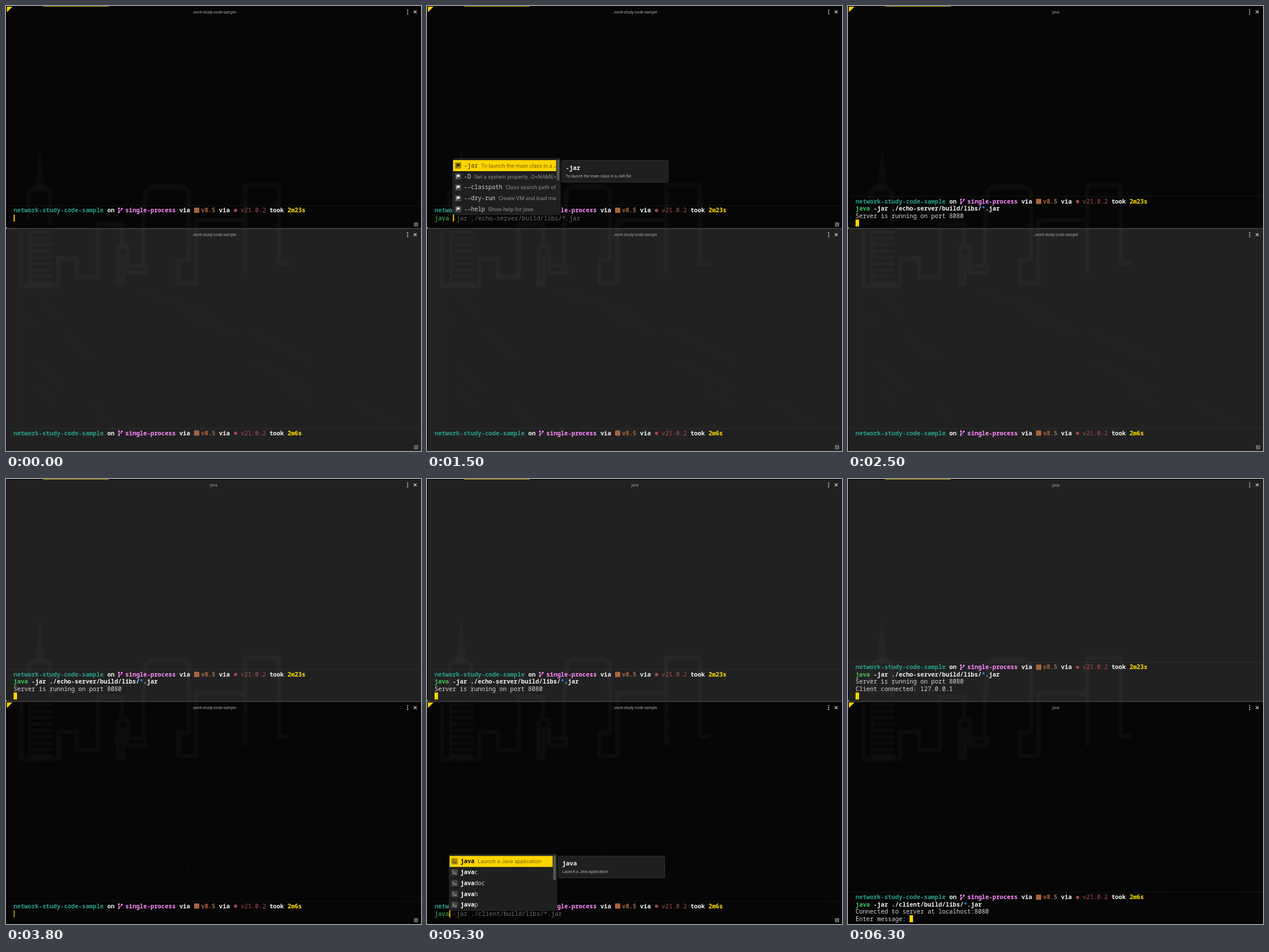
Write an HTML page with a canvas that moves like this. It is 715x768 px and loops after 8000 ms.

```html
<!DOCTYPE html>
<html lang="en">
<head>
<meta charset="utf-8">
<title>Two terminals</title>
<style>
html, body { margin: 0; width: 100%; height: 100%; overflow: hidden; background: #000; }
canvas { display: block; width: 715px; height: 768px; }
</style>
</head>
<body>
<canvas id="stage"></canvas>
<script>
const W = 715, H = 768, LOOP = 8000;
const LEFT = 13, CELL = 6.21, EDIT_CELL = 6.28, ROW = 12.45, PANE = 384.5;
const YELLOW = '#ffd500', GREEN = '#44c25a', WHITE = '#f2f2f2';
const MONO = '"Noto Sans Mono", "DejaVu Sans Mono", monospace';
const SANS = 'Roboto, Arial, sans-serif';

const canvas = document.getElementById('stage');
const dpr = window.devicePixelRatio || 1;
canvas.width = W * dpr;
canvas.height = H * dpr;
const ctx = canvas.getContext('2d');

// Mono advance is 0.6 em, so a cell width fixes the font size.
const mono = (cell, weight = 400) => `${weight} ${cell / 0.6}px ${MONO}`;
const sans = size => `400 ${size}px ${SANS}`;

function text(str, x, y, color, font, align = 'left') {
  ctx.font = font;
  ctx.fillStyle = color;
  ctx.textAlign = align;
  ctx.fillText(str, x, y);
}

function box(x, y, w, h, color) {
  ctx.fillStyle = color;
  ctx.fillRect(x, y, w, h);
}

function roundBox(x, y, w, h, r, fill, line) {
  ctx.beginPath();
  ctx.roundRect(x, y, w, h, r);
  ctx.fillStyle = fill;
  ctx.fill();
  if (line) {
    ctx.strokeStyle = line;
    ctx.lineWidth = 1;
    ctx.stroke();
  }
}

function dot(x, y, r, color) {
  ctx.fillStyle = color;
  ctx.beginPath();
  ctx.arc(x, y, r, 0, 7);
  ctx.fill();
}

// Value of the last key at or before t.
const at = (keys, t) => keys.filter(k => k[0] <= t).pop()[1];

const COMMANDS = {
  icon: 'prompt', bar: 43, title: 'java', note: 'Launch a Java application',
  rows: [['java', 'Launch a Java application'], ['javac'], ['javadoc'], ['javah'], ['javap']]
};
const FLAGS = {
  icon: 'flag', bar: 36, title: '-jar', note: 'To launch the main class in a JAR file',
  rows: [
    ['-jar', 'To launch the main class in a JAR file'],
    ['-D', 'Set a system property, -D<NAME>=<VALUE>'],
    ['--classpath', 'Class search path of directories'],
    ['--dry-run', 'Create VM and load main class'],
    ['--help', 'Show help for java']
  ]
};

const PANES = [
  {
    y: 0, took: '2m23s', command: 'java -jar ./echo-server/build/libs/*.jar', run: 2300,
    typed: [[0, 0], [800, 1], [900, 2], [1000, 3], [1150, 4], [1300, 5], [1650, 40]],
    popup: [[0, null], [850, COMMANDS], [1250, null], [1350, FLAGS], [1600, null]],
    cursor: [[0, 1], [150, 0.45], [200, 0], [650, 1], [2100, 0]],
    output: [[0, ['']], [2450, ['Server is running on port 8080', '']],
      [5850, ['Server is running on port 8080', 'Client connected: 127.0.0.1', '']]]
  },
  {
    y: PANE, took: '2m6s', command: 'java -jar ./client/build/libs/*.jar', run: 5550,
    typed: [[0, 0], [4700, 1], [4850, 2], [4950, 3], [5100, 4], [5400, 35]],
    popup: [[0, null], [4750, COMMANDS], [5350, null]],
    cursor: [[0, 0], [3800, 0.7], [3850, 1], [4300, 0.45], [4350, 0], [4700, 1]],
    output: [[0, ['']], [5800, ['Connected to server at localhost:8080', 'Enter message: ']]]
  }
];
const FOCUS = [[0, 0], [3800, 1]];

const SPIRE = new Path2D('M57 248H60L67 314H50Z');
const SKYLINE = new Path2D(
  'M39 368V322L46 315H70L76 322V376M26 388V483H90V436H122V468H158V376H200V416' +
  'M193 416H210V460H240V448H216M193 416V480H201V428M236 446V380L241 320L249 312H306L315 320V440' +
  'M315 438H297V478H328V370H412V460M412 370V309H470V444H488');
const FLOORS = new Path2D('M41 388V478H80');
for (let i = 0; i < 8; i++) {
  FLOORS.moveTo(41, 390 + i * 11);
  FLOORS.lineTo(80, 390 + i * 11);
}
const ROADS = [
  new Path2D('M22.5 488V710M50 490L90 535M36 535L50 553M100 560L152 611M50 612L100 662' +
    'M58 664L78 684M153 686L190 738M225 492Q300 510 358 534M312 536L390 562M420 560L525 611' +
    'M425 612L525 662M485 664L525 684M600 685L675 726'),
  new Path2D('M22.5 488V710M28 490C60 545 110 555 155 610S205 655 222 690' +
    'M52 490C85 545 140 570 175 615S215 650 232 662M200 488C250 530 285 590 320 690' +
    'M300 530C400 560 500 590 600 700M370 540C480 570 570 600 700 728M440 640L540 710')
];

function scenery(focus) {
  ctx.lineJoin = 'round';
  ctx.lineCap = 'butt';
  const line = (path, width, alpha) => {
    ctx.strokeStyle = `rgba(255,255,255,${alpha})`;
    ctx.lineWidth = width;
    ctx.stroke(path);
  };
  ctx.fillStyle = 'rgba(255,255,255,0.024)';
  ctx.fill(SPIRE);
  line(SKYLINE, 9, 0.018);
  line(SKYLINE, 5, 0.009);
  line(FLOORS, 6, 0.024);
  line(ROADS[focus], 1, 0.03);
}

function chrome(title, active, idle) {
  text(title, 358, 12.6, '#a6a6a6', sans(6.75), 'center');
  [6.8, 10.2, 13.6].forEach(y => dot(692, y, 1, '#ddd'));
  ctx.strokeStyle = '#ddd';
  ctx.lineWidth = 1.1;
  ctx.beginPath();
  ctx.moveTo(702.5, 7.7); ctx.lineTo(707.5, 12.7);
  ctx.moveTo(707.5, 7.7); ctx.lineTo(702.5, 12.7);
  ctx.stroke();
  if (active) {
    ctx.fillStyle = YELLOW;
    ctx.beginPath();
    ctx.moveTo(1.5, 1.3); ctx.lineTo(11, 1.3); ctx.lineTo(1.5, 10.8);
    ctx.fill();
  }
  if (idle) {
    roundBox(703, 373.5, 7, 7, 1, '#777');
    box(704.5, 375, 1.4, 1.4, '#222');
    box(707, 375, 1.4, 1.4, '#222');
    box(704.5, 377.6, 4, 1.2, '#222');
  }
}

function branch(x, y) {
  ctx.strokeStyle = '#ff8cff';
  ctx.lineWidth = 1.1;
  ctx.beginPath();
  ctx.moveTo(x, y - 3); ctx.lineTo(x, y + 3);
  ctx.moveTo(x + 5, y - 2.5);
  ctx.quadraticCurveTo(x + 5, y + 0.6, x, y + 1.2);
  ctx.stroke();
  dot(x, y - 3.2, 1.5, '#ff8cff');
  dot(x, y + 3.4, 1.5, '#ff8cff');
  dot(x + 5, y - 2.8, 1.5, '#ff8cff');
}

function prompt(y, took) {
  box(2, Math.round(y - 9), W - 3, 1, 'rgba(255,255,255,0.055)');
  const word = (col, str, color, weight = 700) =>
    text(str, LEFT + col * CELL, y + 3.5, color, mono(CELL, weight));
  word(0, 'network-study-code-sample', '#2b9c8a');
  word(26, 'on', WHITE, 600);
  branch(194.5, y);
  word(31, 'single-process', '#ff8cff');
  word(46, 'via', WHITE, 600);
  roundBox(324, y - 4.5, 9, 9, 1, '#a5673f');
  word(52, 'v8.5', '#a5673f');
  word(57, 'via', WHITE, 600);
  dot(395.5, y + 0.3, 2.8, '#a8434c');
  word(63, 'v21.0.2', '#b04c56', 500);
  word(71, 'took', WHITE, 600);
  word(76, took, '#ffe000');
}

function command(str, y, cell, weight) {
  const font = mono(cell, weight);
  const known = str.startsWith('java');
  const star = str.indexOf('*');
  const put = (from, to, color) =>
    text(str.slice(from, to), LEFT + from * cell, y + 3.5, color, font);
  if (known) put(0, 4, GREEN);
  const rest = known ? 4 : 0;
  if (star < 0) return put(rest, str.length, WHITE);
  put(rest, star, WHITE);
  put(star, star + 1, '#2f8fff');
  put(star + 1, str.length, WHITE);
}

function itemIcon(kind, x, y, chosen) {
  roundBox(x, y - 5.5, 11, 11, 1.5, chosen ? '#a88d00' : '#444');
  const ink = chosen ? '#2a2300' : '#ddd';
  if (kind === 'flag') {
    box(x + 3, y - 3, 1, 6.5, ink);
    box(x + 4, y - 3, 4.5, 4, ink);
    return;
  }
  ctx.strokeStyle = ink;
  ctx.lineWidth = 0.9;
  ctx.beginPath();
  ctx.moveTo(x + 2.3, y - 2); ctx.lineTo(x + 4.5, y); ctx.lineTo(x + 2.3, y + 2);
  ctx.moveTo(x + 5.2, y + 2.4); ctx.lineTo(x + 8.6, y + 2.4);
  ctx.stroke();
}

function popup(list, x, typed) {
  const cell = 6;
  roundBox(x + 0.5, 263.5, 185, 96.5, 2, '#1f1f1f', '#2d2d2d');
  box(x + 1, 266, 177.5, 19, YELLOW);
  roundBox(x + 179.5, 265, 4.5, list.bar, 2, '#555');
  ctx.save();
  ctx.beginPath();
  ctx.rect(x, 263, 178.5, 97);
  ctx.clip();
  list.rows.forEach(([name, note = ''], i) => {
    const y = 275.3 + i * 18.8, chosen = i === 0;
    const bold = list === COMMANDS ? typed : 0;
    const split = Math.min(bold, name.length);
    itemIcon(list.icon, x + 4, y, chosen);
    text(name.slice(0, split), x + 19.8, y + 3.4, chosen ? '#000' : '#fff', mono(cell, 700));
    text(name.slice(split), x + 19.8 + split * cell, y + 3.4, chosen ? '#3a3000' : '#cfcfcf', mono(cell, 500));
    text(note, x + 25.3 + name.length * cell, y + 3.4, chosen ? '#7a6600' : '#8c8c8c', sans(9.53));
  });
  ctx.restore();
  roundBox(x + 188.5, 266.5, 183, 37.5, 2, '#1f1f1f', '#323232');
  text(list.title, x + 195, 282.8, WHITE, mono(6.3, 700));
  text(list.note, x + 195, 295.6, '#b0b0b0', sans(6.85));
}

function editor(pane, t) {
  const count = at(pane.typed, t), y = 366;
  const x = LEFT + count * EDIT_CELL;
  prompt(352.5, pane.took);
  if (count) {
    text(pane.command.slice(count), x, y + 3.5, '#6e6e6e', mono(EDIT_CELL));
    command(pane.command.slice(0, count), y, EDIT_CELL, 500);
    if (count < 4) {
      for (let u = LEFT; u < x - 1; u += 2) box(u, 371, 1, 1, '#bbb');
    }
  }
  const list = at(pane.popup, t);
  if (list) popup(list, Math.round(x), count);
  ctx.globalAlpha = at(pane.cursor, t);
  box(x + 0.2, 360, 1.8, 12, YELLOW);
  ctx.globalAlpha = 1;
}

function session(pane, t) {
  const lines = at(pane.output, t), last = 374.5;
  const y = last - ROW * (lines.length + 1);
  prompt(y, pane.took);
  command(pane.command, y + ROW, CELL, 700);
  lines.forEach((line, i) =>
    text(line, LEFT, y + ROW * (i + 2) + 3.5, '#d6d6d6', mono(CELL, 500)));
  const column = lines[lines.length - 1].length;
  box(Math.round(LEFT + column * CELL), last - 6, 6, 12, YELLOW);
}

function draw(t) {
  const focus = at(FOCUS, t);
  ctx.setTransform(dpr, 0, 0, dpr, 0, 0);
  box(0, 0, W, H, '#000');
  PANES.forEach((pane, i) =>
    box(1, i ? 385 : 1, W - 1, i ? H - 385 : 382, i === focus ? '#060606' : '#212121'));
  scenery(focus);
  box(0, 383, W, 2, '#383838');
  box(0, 381.5, 1.5, 3, '#8a8a8a');
  box(64, 0, 113, 1, '#b89b00');
  PANES.forEach((pane, i) => {
    const running = t >= pane.run;
    ctx.save();
    ctx.translate(0, pane.y);
    chrome(running ? 'java' : '..work-study-code-sample', i === focus, !running);
    (running ? session : editor)(pane, t);
    ctx.restore();
  });
}

function tick() {
  draw(performance.now() % LOOP);
  requestAnimationFrame(tick);
}
tick();
</script>
</body>
</html>
```
